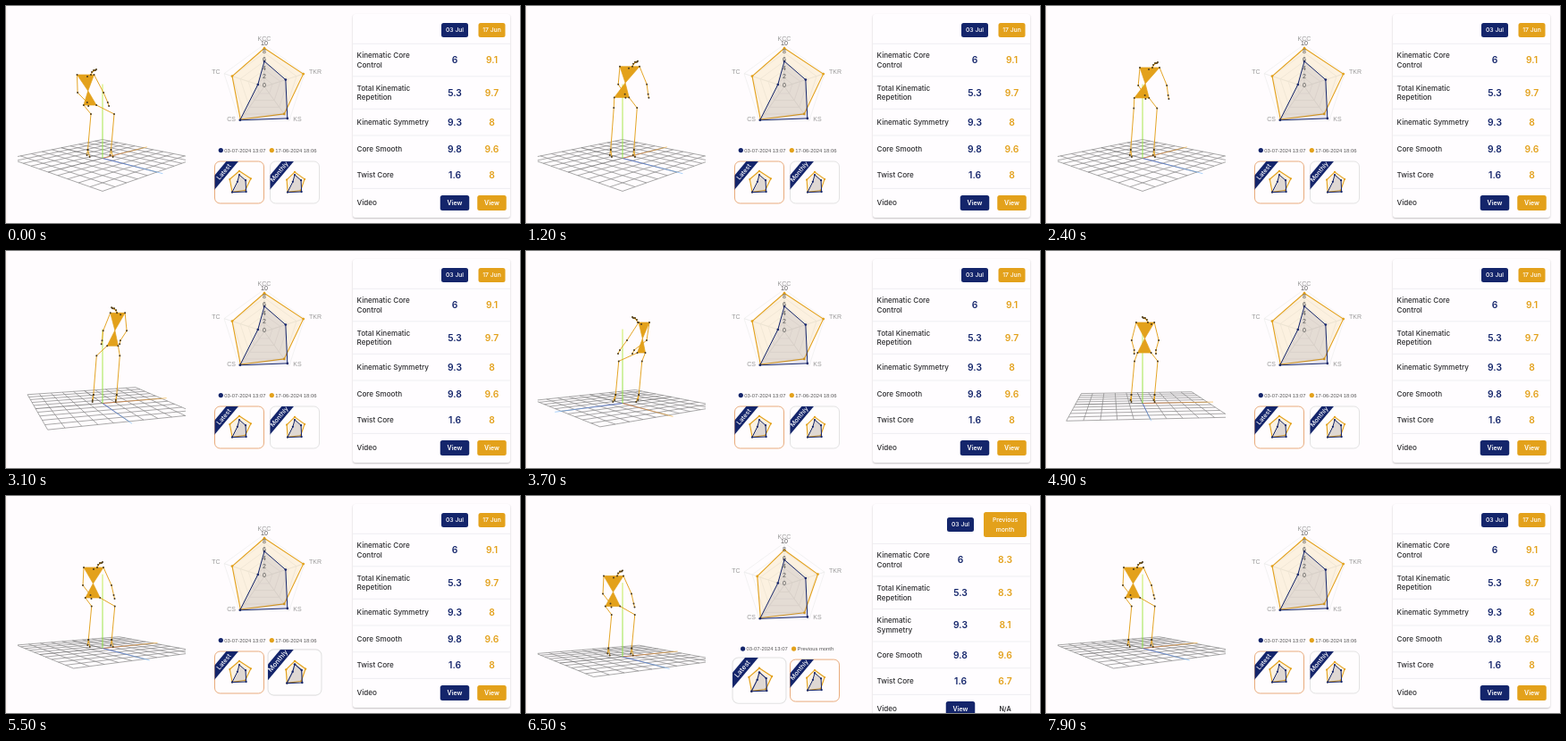
Recreate the animation shown at these times as an HTML page with a canvas. Size 575 by 243 pixels, loop 8 s.

```html
<!DOCTYPE html>
<html lang="en">
<head>
<meta charset="utf-8">
<title>Movement report</title>
<style>
html, body { margin: 0; width: 100%; height: 100%; overflow: hidden; background: #fff; }
canvas { display: block; width: 575px; height: 243px; }
</style>
</head>
<body>
<canvas id="stage"></canvas>
<script>
const W = 575, H = 243, LOOP = 8000;
const NAVY = '#14256b', GOLD = '#e3a11b', INK = '#2b2b2e';
const TO_MONTH = 5900, TO_LATEST = 6800;
const UI = 'Inter, sans-serif', CHART = '"Liberation Sans", Arial, sans-serif';

const canvas = document.getElementById('stage');
const ctx = canvas.getContext('2d');
const dpr = window.devicePixelRatio || 1;
canvas.width = W * dpr;
canvas.height = H * dpr;

const clamp = v => Math.max(0, Math.min(1, v));
const mix = (a, b, k) => a + (b - a) * k;
const smooth = k => k * k * (3 - 2 * k);

// Eased blend of the two keys around t
function blend(keys, t) {
  let i = 0;
  while (i < keys.length - 2 && t >= keys[i + 1].t) i++;
  const a = keys[i], b = keys[i + 1], k = smooth(clamp((t - a.t) / (b.t - a.t)));
  return Object.fromEntries(Object.keys(a).map(n => [n, mix(a[n], b[n], k)]));
}

function text(str, x, y, size, color, weight = 400, family = UI, align = 'center') {
  ctx.font = `${weight} ${size}px ${family}`;
  ctx.fillStyle = color;
  ctx.textAlign = align;
  ctx.textBaseline = 'alphabetic';
  ctx.fillText(str, x, y + size * 0.36);
}

function box(x, y, w, h, r, fill, stroke) {
  ctx.beginPath();
  ctx.roundRect(x, y, w, h, r);
  if (fill) { ctx.fillStyle = fill; ctx.fill(); }
  if (stroke) { ctx.strokeStyle = stroke; ctx.lineWidth = 1; ctx.stroke(); }
}

function path(pts, { close, fill, stroke, width = 1 } = {}) {
  ctx.beginPath();
  pts.forEach(([x, y], i) => i ? ctx.lineTo(x, y) : ctx.moveTo(x, y));
  if (close) ctx.closePath();
  if (fill) { ctx.fillStyle = fill; ctx.fill(); }
  if (stroke) { ctx.strokeStyle = stroke; ctx.lineWidth = width; ctx.stroke(); }
}

function dot(x, y, r, color) {
  ctx.fillStyle = color;
  ctx.beginPath();
  ctx.arc(x, y, r, 0, Math.PI * 2);
  ctx.fill();
}

// ---------- 3D floor ----------
const VIEW = { x: 13, w: 188, cx: 108, cy: 170.5, focal: 368 };
const GRID = 0.2015, AXIS = 0.22;
const ORBIT = [
  { t: 2800, yaw: 45, tilt: 0.255 },
  { t: 3700, yaw: 145, tilt: 0.185 },
  { t: 4400, yaw: 116, tilt: 0.23 },
  { t: 5350, yaw: 58, tilt: 0.16 }
];

function camera(t) {
  const { yaw, tilt: s } = blend(ORBIT, t);
  const c = Math.sqrt(1 - s * s), a = yaw * Math.PI / 180;
  const zx = Math.cos(a), zf = Math.sin(a);
  return (x, h, z) => {
    const right = z * zx + x * zf, near = z * zf - x * zx;
    const k = VIEW.focal / (1 - near * c - h * s);
    return [VIEW.cx + right * k, VIEW.cy + (near * s - h * c) * k];
  };
}

function axis(a, b, from, to, alpha) {
  const g = ctx.createLinearGradient(...a, ...b);
  g.addColorStop(0, from);
  g.addColorStop(1, to);
  ctx.globalAlpha = alpha;
  path([a, b], { stroke: g });
  ctx.globalAlpha = 1;
}

function floor(t) {
  const p = camera(t);
  for (let i = -5; i <= 5; i++) {
    const v = i / 5 * GRID, stroke = i ? '#8d8d8d' : '#666';
    path([p(v, 0, -GRID), p(v, 0, GRID)], { stroke, width: 0.75 });
    path([p(-GRID, 0, v), p(GRID, 0, v)], { stroke, width: 0.75 });
  }
  const o = p(0, 0, 0);
  axis(o, p(AXIS, 0, 0), '#e8742c', '#f3ac2e', 0.6);
  axis(o, p(0, 0, AXIS), '#3f66ee', '#6db4f7', 0.6);
  axis(o, p(0, AXIS, 0), '#86e03c', '#cdee5c', 1);
}

// ---------- figure ----------
const STAND = { chest: 116, y: 69, half: 11, hip: 107, turn: 0.4 };
const POSES = [
  { t: 0, chest: 89, y: 77, half: 9.5, hip: 94, turn: 0.7 },
  { t: 1000, ...STAND },
  { t: 2400, ...STAND },
  { t: 3700, chest: 132, y: 80, half: 6, hip: 129, turn: -1 },
  { t: 4400, chest: 121, y: 80, half: 9.5, hip: 120, turn: -0.4 },
  { t: 5500, chest: 98, y: 80, half: 11, hip: 97, turn: 0.5 }
];
const ANKLE_Y = 161;

function figure(t) {
  const { chest, y, half, hip, turn } = blend(POSES, t);
  const rise = t > 1000 && t < 3700 ? 6 * Math.sin(Math.PI * (t - 1000) / 1350) ** 2 : 0;
  const top = y - rise, hipY = y + 34 - rise / 2;
  const feet = mix(VIEW.cx, hip, 0.25);
  const line = { stroke: GOLD, width: 0.95 };
  const solid = { close: true, fill: GOLD, stroke: GOLD, width: 0.7 };
  const dots = [];
  const limb = (pts, style = line) => { path(pts, style); dots.push(...pts); };

  const waist = [mix(chest, hip, 0.55), mix(top, hipY, 0.53)];
  path([[chest - half, top], [chest + half, top], waist], solid);
  path([[hip - half * 0.75, hipY], [hip + half * 0.75, hipY], waist], solid);

  for (const s of [-1, 1]) {
    const shoulder = [chest + s * half, top];
    const elbow = [shoulder[0] + s * 5 + turn * 8, top + 20];
    const wrist = [elbow[0] - s * 3 + turn * 11, elbow[1] + 11];
    limb([shoulder, elbow, wrist, [wrist[0] + turn * 2, wrist[1] + 4]]);

    const ankle = [feet + s * 13, ANKLE_Y];
    const knee = [ankle[0] + 3.5, mix(hipY, ANKLE_Y, 0.2)];
    limb([[hip + s * half * 0.75, hipY], knee, ankle, [ankle[0] - 1, ankle[1] + 6]]);
    limb([ankle, [ankle[0] + turn * 3, ankle[1] + 8]]);
  }

  // Face runs as a zigzag from the ear to the raised brow
  const hx = chest + 1 + turn * 10, hy = top - 7, side = turn < 0 ? -1 : 1;
  const face = [-6, -2, 1, 4].map((d, i) => [hx + side * d, hy + 3 - d + (i % 2) * 2]);
  limb(face, { fill: GOLD, ...line });
  limb([[hx - side, hy + 4], [hx + side * 3, hy + 2]]);
  dots.forEach(([px, py]) => dot(px, py, 1, '#4a3a1e'));
}

function scene(t, dy) {
  ctx.save();
  ctx.beginPath();
  ctx.rect(VIEW.x, 0, VIEW.w, H);
  ctx.clip();
  ctx.translate(0, dy);
  floor(t);
  figure(t);
  ctx.restore();
}

// ---------- radar ----------
const NOW = [6, 5.3, 9.3, 9.8, 1.6];
const JUNE = [9.1, 9.7, 8, 9.6, 8];
const MONTH = [8.3, 8.3, 8.1, 9.6, 6.7];
const FULL = Array(5).fill(10);

const ring = (cx, cy, r, values) => values.map((v, i) => {
  const a = (i * 72 - 90) * Math.PI / 180;
  return [cx + Math.cos(a) * r * v / 10, cy + Math.sin(a) * r * v / 10];
});

function series(pts, color, fill, width, r) {
  path(pts, { close: true, fill, stroke: color, width });
  pts.forEach(([x, y]) => dot(x, y, r, color));
}

function goldValues(t) {
  const shift = start => 1 - (1 - clamp((t - start) / 1000)) ** 4;
  const k = shift(TO_MONTH) * (1 - shift(TO_LATEST));
  return JUNE.map((v, i) => mix(v, MONTH[i], k));
}

function radar(t, monthly) {
  const cx = 289, cy = monthly ? 99.8 : 90.3, r = 47.3;
  const thin = { close: true, stroke: '#ececec', width: 0.7 };
  for (let k = 1; k <= 5; k++) path(ring(cx, cy, r * k / 5, FULL), thin);
  ring(cx, cy, r, FULL).forEach(p => path([[cx, cy], p], thin));
  series(ring(cx, cy, r, goldValues(t)), GOLD, 'rgba(227,161,27,.13)', 1.1, 1.4);
  series(ring(cx, cy, r, NOW), NAVY, 'rgba(20,37,107,.10)', 1, 1.3);
  for (let v = 0; v <= 10; v += 2) text(v, cx, cy - 2 - v * r / 10, 7, '#555', 400, CHART);
  const labels = [['KCC', 0, -54], ['TKR', 57, -16.5], ['KS', 37, 36], ['CS', -37, 36], ['TC', -54, -16.5]];
  labels.forEach(([s, x, y]) => text(s, cx + x, cy + y, 7, '#999', 400, CHART));

  const ly = cy + 71.3, x = monthly ? 242.6 : 240.3;
  const legend = ['03-07-2024 13:07', monthly ? 'Previous month' : '17-06-2024 18:06'];
  legend.forEach((s, i) => {
    dot(x + i * 57, ly, 2.6, i ? GOLD : NAVY);
    text(s, x + i * 57 + 4, ly, 5.85, '#555', 400, CHART, 'left');
  });
}

function thumb(cx, cy, label, values, active, scale) {
  ctx.save();
  ctx.translate(cx, cy);
  ctx.scale(scale, scale);
  box(-27.5, -23.5, 55, 47, 6, '#fffdfe', active ? '#e9ab7c' : '#e2e2e2');
  series(ring(0, 0, 14, values), GOLD, 'rgba(227,161,27,.12)', 1.1, 1.1);
  series(ring(0, 0, 14, NOW), NAVY, 'rgba(20,37,107,.12)', 1, 1.1);
  ctx.beginPath();
  ctx.roundRect(-27.5, -23.5, 55, 47, 6);
  ctx.clip();
  ctx.translate(-17.5, -12);
  ctx.rotate(-50 * Math.PI / 180);
  ctx.fillStyle = NAVY;
  ctx.fillRect(-30, -5.2, 60, 10.4);
  text(label, 0, 0, 7, '#fff', 500);
  ctx.restore();
}

function thumbs(t, monthly) {
  const y = monthly ? 206.6 : 197.5;
  const hover = (a, b) => 1 + 0.09 * (smooth(clamp((t - a) / 200)) - smooth(clamp((t - b) / 200)));
  thumb(261, y, 'Latest', JUNE, !monthly, hover(6250, 7100));
  thumb(323, y, 'Monthly', MONTH, monthly, hover(5250, 6050));
}

// ---------- table ----------
const ONE_LINE = 29.7, TWO_LINES = 36.5;
const NAMES = [['Kinematic Core', 'Control'], ['Total Kinematic', 'Repetition'], ['Kinematic Symmetry'], ['Core Smooth'], ['Twist Core']];

function stack(lines, x, y, gap, ...style) {
  lines.forEach((s, i) => text(s, x, y + (i - (lines.length - 1) / 2) * gap, ...style));
}

function button(cx, cy, w, h, color, lines, size = 6.8, weight = 500) {
  box(cx - w / 2, cy - h / 2, w, h, 2.5, color);
  stack(lines, cx, cy, 11, size, '#fff', weight);
}

function table(monthly) {
  ctx.save();
  ctx.shadowColor = 'rgba(0,0,0,.24)';
  ctx.shadowBlur = 2 * dpr;
  ctx.shadowOffsetY = dpr;
  box(388, 9, 176, monthly ? 250 : 228, 3, '#fffdff');
  ctx.restore();

  const c1 = monthly ? 486 : 502, c2 = monthly ? 536 : 543.5;
  let top = monthly ? 53.5 : 42.3;
  const rule = () => path([[388, top], [564, top]], { stroke: '#e9e9ec', width: 0.7 });
  const label = (lines, y) => stack(lines, 392.5, y, 10.8, 8.1, INK, 500, UI, 'left');

  const headY = monthly ? 32 : 27;
  button(c1, headY, 30, 16, NAVY, ['03 Jul']);
  if (monthly) button(c2, headY, 48, 28, GOLD, ['Previous', 'month']);
  else button(c2, headY, 30, 16, GOLD, ['17 Jun']);

  NAMES.forEach((name, i) => {
    const lines = monthly && name[0].length > 16 ? name[0].split(' ') : name;
    const height = lines.length > 1 ? TWO_LINES : ONE_LINE, y = top + height / 2;
    rule();
    label(lines, y);
    text(NOW[i], c1, y, 10.3, NAVY, 600);
    text((monthly ? MONTH : JUNE)[i], c2, y, 10.3, GOLD, 600);
    top += height;
  });

  rule();
  const y = top + 16;
  label(['Video'], y);
  button(c1, y, 32.5, 17, NAVY, ['View'], 7, 600);
  if (monthly) text('N/A', c2, y, 7.2, INK, 600);
  else button(c2, y, 32.5, 17, GOLD, ['View'], 7, 600);
}

function draw(t) {
  const monthly = t >= TO_MONTH && t < TO_LATEST;
  ctx.setTransform(dpr, 0, 0, dpr, 0, 0);
  ctx.fillStyle = '#fffcfe';
  ctx.fillRect(0, 0, W, H);
  ctx.fillStyle = '#fdf3f1';
  ctx.fillRect(0, 0, 1.5, H);
  ctx.lineJoin = 'round';
  scene(t, monthly ? 9.5 : 0);
  radar(t, monthly);
  thumbs(t, monthly);
  table(monthly);
}

const start = performance.now();
function tick() {
  draw((performance.now() - start) % LOOP);
  requestAnimationFrame(tick);
}
tick();
</script>
</body>
</html>
```
